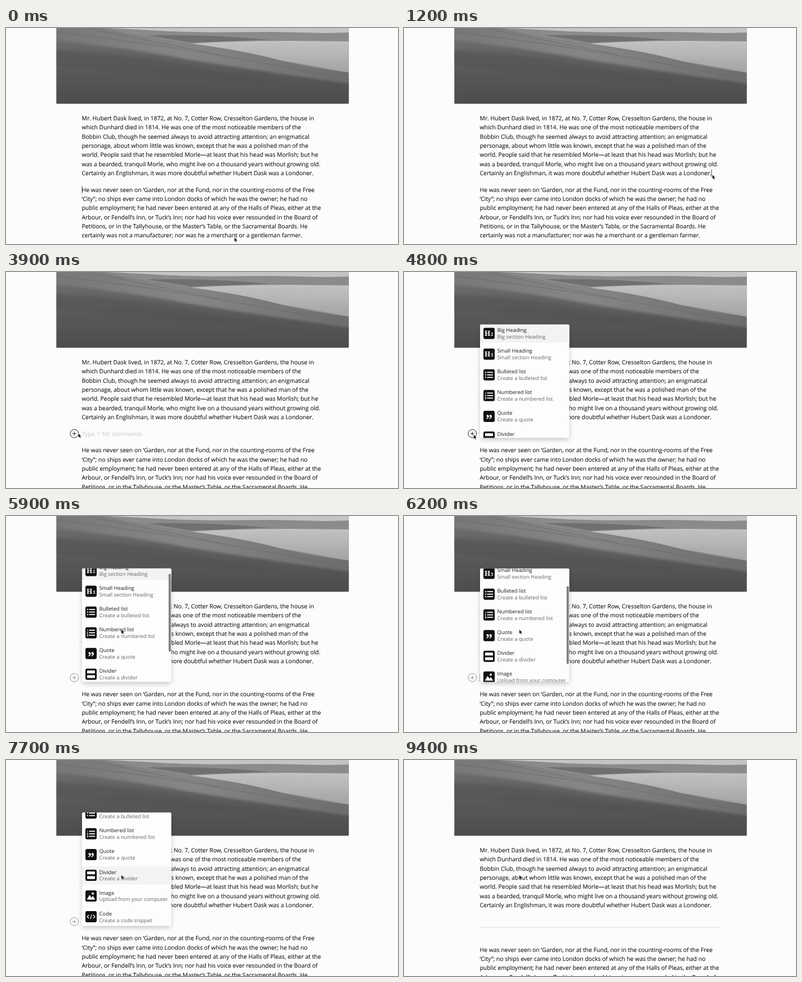
Recreate the animation shown at these times as an HTML page. Size 696 by 386 pixels, loop 9.5 s.

```html
<!DOCTYPE html>
<html lang="en">
<head>
<meta charset="utf-8">
<title>Block menu</title>
<style>
  html, body { margin: 0; width: 100%; height: 100%; overflow: hidden; background: #fcfcfc; }
  svg { display: block; width: 696px; height: 386px; }
  text { font-family: "Open Sans", sans-serif; text-rendering: geometricPrecision; white-space: pre; }
  .body { font-size: 10.4px; fill: #161616; stroke: #161616; stroke-width: .1px; }
  .hint { font-size: 10.4px; fill: #c6c6c6; }
  .title, .sub { font-size: 9.33px; fill: #1c1c1c; }
  .sub { fill: #666; }
  .serif { font-family: "Noto Serif", serif; font-weight: 600; fill: #fff; }
</style>
</head>
<body>
<svg viewBox="0 0 696 386">
  <defs>
    <linearGradient id="slope" x1="0" y1="0" x2="1" y2="0">
      <stop offset="0" stop-color="#777"/><stop offset=".45" stop-color="#868686"/><stop offset="1" stop-color="#6c6c6c"/>
    </linearGradient>
    <linearGradient id="dune" x1="0" y1="0" x2="0" y2="1">
      <stop offset="0" stop-color="#6c6c6c"/><stop offset=".5" stop-color="#575757"/><stop offset="1" stop-color="#4a4a4a"/>
    </linearGradient>
    <linearGradient id="lake" x1="0" y1="0" x2="0" y2="1">
      <stop offset="0" stop-color="#c2c2c2"/><stop offset="1" stop-color="#a2a2a2"/>
    </linearGradient>
    <clipPath id="photoClip"><rect x="89.5" width="519" height="135.3"/></clipPath>
    <clipPath id="menuClip"><rect x="135" y="93.7" width="158.5" height="202.8" rx="2"/></clipPath>
    <filter id="soft" x="-20%" y="-20%" width="140%" height="140%"><feGaussianBlur stdDeviation="5"/></filter>
    <filter id="haze" x="-5%" y="-20%" width="110%" height="140%"><feGaussianBlur stdDeviation="2.2"/></filter>
  </defs>

  <rect width="696" height="386" fill="#fcfcfc"/>
  <g clip-path="url(#photoClip)">
    <rect x="80" width="540" height="136" fill="#8a8a8a"/>
    <path d="M180 0H609V10L470 7 330 8Z" fill="#c4c4c4"/>
    <path d="M225 7Q310 5 380 9T500 11L609 8V25H300Z" fill="#8b8b8b"/>
    <path d="M250 13Q330 12 400 16L470 21 330 26Z" fill="#707070"/>
    <path d="M328 28Q400 23 500 23L620 24V82Q540 66 480 57Q400 42 328 28Z" fill="url(#lake)"/>
    <path d="M80 -4H150Q240 16 330 28T480 56T620 81V112Q440 76 300 56T80 22Z" fill="url(#slope)"/>
    <path d="M70 20Q200 34 300 52T630 102V150H70Z" fill="url(#dune)" filter="url(#haze)"/>
    <path d="M70 39Q220 46 330 68T520 105Q330 88 70 66Z" fill="#505050" opacity=".4" filter="url(#haze)"/>
    <path d="M80 6Q230 24 350 44T620 95M150 2Q260 24 380 48" fill="none" stroke="#666" stroke-width="1.2" opacity=".6"/>
  </g>

  <g id="first"></g>
  <g id="second"></g>
  <rect id="divider" x="135" y="298.6" width="428" height="1" fill="#dedede"/>
  <g id="empty">
    <text class="hint" x="134.5" y="292.6">Type '/' for commands</text>
    <g id="plus" fill="none">
      <circle cx="121.3" cy="288.8" r="7.4"/>
      <path d="M117.8 288.8h7M121.3 285.3v7"/>
    </g>
  </g>
  <rect id="caret" width="1" height="13.4" fill="#4a4a4a"/>

  <g id="menu">
    <rect x="136" y="98" width="156.5" height="201" rx="3" fill="#000" opacity=".24" filter="url(#soft)"/>
    <rect x="135" y="93.7" width="158.5" height="202.8" rx="2" fill="#fdfdfd"/>
    <g clip-path="url(#menuClip)">
      <g id="list"><rect id="mark" x="135" width="159" height="32.4" fill="#f3f3f3"/></g>
      <rect id="thumb" x="288.8" width="3.8" height="139" rx="1.9" fill="#7d7d7d"/>
    </g>
  </g>

  <g id="cursor">
    <path id="arrow" d="M0 0V8.1L1.8 6.5 3 9.3 4.4 8.7 3.2 6H5.7Z" fill="#000" stroke="#fff" stroke-width=".6"/>
    <path id="hand" d="M-1 4.8V.2Q-.1-1 .8.2V3Q1.8 2.4 2.3 3.4 3.3 2.9 3.7 3.8 4.8 3.6 4.8 4.8V6.2L3.9 9.3H-.7L-3.6 5.6Q-3.8 4.3-2.5 4.4Z" fill="#fff" stroke="#111" stroke-width=".8"/>
  </g>
</svg>
<script>
const LOOP = 9500, STEP = 100;
const LINE = 16.3, LEFT = 134.5;
const TOP = 94, PITCH = 37.05, MAX_SCROLL = 89;
const $ = id => document.getElementById(id);
const set = (el, attrs) => { for (const k in attrs) el.setAttribute(k, attrs[k]); };
const show = (el, on) => set(el, { visibility: on ? "visible" : "hidden" });
const move = (el, x, y) => set(el, { transform: `translate(${x} ${y})` });
const clamp = v => Math.max(0, Math.min(1, v));
const span = (t, a, b) => clamp((t - a) / (b - a));
const smooth = p => p * p * (3 - 2 * p);

const first = [
  "Mr. Hubert Dask lived, in 1872, at No. 7, Cotter Row, Cresselton Gardens, the house in",
  "which Dunhard died in 1814. He was one of the most noticeable members of the",
  "Bobbin Club, though he seemed always to avoid attracting attention; an enigmatical",
  "personage, about whom little was known, except that he was a polished man of the",
  "world. People said that he resembled Morle—at least that his head was Morlish; but he",
  "was a bearded, tranquil Morle, who might live on a thousand years without growing old.",
  "Certainly an Englishman, it was more doubtful whether Hubert Dask was a Londoner."
];
const second = [
  "He was never seen on ‘Garden, nor at the Fund, nor in the counting-rooms of the Free",
  "‘City”; no ships ever came into London docks of which he was the owner; he had no",
  "public employment; he had never been entered at any of the Halls of Pleas, either at the",
  "Arbour, or Fendell’s Inn, or Tuck’s Inn; nor had his voice ever resounded in the Board of",
  "Petitions, or in the Tallyhouse, or the Master’s Table, or the Sacramental Boards. He",
  "certainly was not a manufacturer; nor was he a merchant or a gentleman farmer."
];
const paragraph = (id, lines, y) => {
  $(id).innerHTML = lines.map((s, i) =>
    `<text class="body" x="${LEFT}" y="${y + i * LINE}">${s}</text>`).join("");
};
paragraph("first", first, 165);
paragraph("second", second, 292.6);

// Icons are drawn around their centre
const stroke = (d, w) => `<path d="${d}" fill="none" stroke="#fff" stroke-width="${w}"/>`;
const heading = n => `<text class="serif" x="-8" y="4.6" font-size="12.5">H</text>
  <text class="serif" x="2.9" y="4.6" font-size="8">${n}</text>`;
const rows = "M-3.5-4.5h10.5M-3.5 0h10.5M-3.5 4.5h10.5";
const items = [
  ["Big Heading", "Big section Heading", heading(2)],
  ["Small Heading", "Small section Heading", heading(3)],
  ["Bulleted list", "Create a bulleted list",
    stroke(rows, 1.7) + stroke("M-7.2-4.5h2M-7.2 0h2M-7.2 4.5h2", 2)],
  ["Numbered list", "Create a numbered list",
    stroke(rows, 1.7) + stroke("M-6.2-6.2v3.2M-7.2-1.3h1.5l-1.5 2.6h2M-7.2 3.2h1.7v2.8h-1.7M-7.2 4.6h1.7", .8)],
  ["Quote", "Create a quote", `<text class="serif" x="0" y="15.2" font-size="25" text-anchor="middle">”</text>`],
  ["Divider", "Create a divider",
    `<rect x="-7" y="-6.8" width="14" height="5.2" rx="1" fill="#fff"/><rect x="-7" y="1.6" width="14" height="5.2" rx="1" fill="#fff"/>`],
  ["Image", "Upload from your computer",
    `<path d="M-7.5 6.5-2.5-2 .8 3 3-.2 7.5 6.5Z" fill="#fff"/><circle cx="3" cy="-4.3" r="2" fill="#fff"/>`],
  ["Code", "Create a code snippet", stroke("M-3.8-3-7 0-3.8 3M3.8-3 7 0 3.8 3M1.3-4.2-1.3 4.2", 1.2)]
];
$("list").insertAdjacentHTML("beforeend", items.map(([title, sub, icon], i) => `
  <g transform="translate(0 ${TOP + i * PITCH})">
    <g transform="translate(151 15.7)"><rect x="-10" y="-10" width="20" height="20" rx="3" fill="#111"/>${icon}</g>
    <text class="title" x="165.4" y="13.3">${title}</text>
    <text class="sub" x="165.4" y="25.2">${sub}</text>
  </g>`).join(""));

// Pointer path: time, x, y
const path = [
  [0, 405.5, 374], [1000, 547.5, 262], [2700, 547.5, 262], [2800, 509, 258.5],
  [3700, 133, 285.5], [4100, 123.7, 290.3], [5000, 123.7, 290.3], [5600, 204.7, 202.6],
  [7100, 204.7, 202.8], [7400, 198.5, 204], [7700, 204.7, 205.2], [LOOP, 204.7, 205.2]
];
function pointer(t) {
  const i = path.findIndex(k => k[0] > t);
  const [a, x, y] = path[i - 1], [b, u, v] = path[i];
  const p = smooth(span(t, a, b));
  return [x + (u - x) * p, y + (v - y) * p];
}

// Caret as x and baseline, or null while it is off
function caretAt(t) {
  const blink = start => Math.floor((t - start) / 500) % 2 === 0;
  if (t < 1000) return t < 400 || t >= 900 ? [135, 292.6] : null;
  if (t < 2100) return t >= 1200 && t < 1700 ? [545.9, 262.8] : null;
  if (t < 7900) return blink(2100) ? [135, 292.6] : null;
  return blink(7900) ? [135, 342.8] : null;
}

function draw(t) {
  const editing = t >= 2100 && t < 7900;
  move($("second"), 0, t < 2100 ? 0 : editing ? 29.9 : 50.2);
  show($("empty"), editing);
  show($("divider"), t >= 7900);
  const hover = t >= 3900 && t < 5200;
  set($("plus"), { stroke: hover ? "#222" : "#858585", "stroke-width": hover ? 1 : .9 });

  const caret = caretAt(t);
  show($("caret"), caret);
  if (caret) set($("caret"), { x: caret[0] - .4, y: caret[1] - 10.1 });

  set($("menu"), { opacity: editing ? smooth(span(t, 4400, 4800)) : 0 });
  const scroll = MAX_SCROLL * (1 - Math.pow(1 - span(t, 5800, 7000), 1.69));
  move($("list"), 0, -scroll);
  set($("mark"), { y: TOP + (t < 7000 ? 0 : 5) * PITCH - .2 });
  set($("thumb"), {
    y: 94.8 + scroll * .693,
    opacity: t < 5900 ? 0 : 1 - span(t, 7100, 7700)
  });

  const hand = t >= 6400 && t < 7300;
  const [x, y] = pointer(t), seen = t < 2100 || t >= 2800;
  move($("cursor"), x, y);
  show($("arrow"), seen && !hand);
  show($("hand"), seen && hand);
}

const origin = performance.now();
function tick() {
  const t = (performance.now() - origin) % LOOP;
  draw(Math.floor(t / STEP) * STEP);
  requestAnimationFrame(tick);
}
tick();
</script>
</body>
</html>
```
